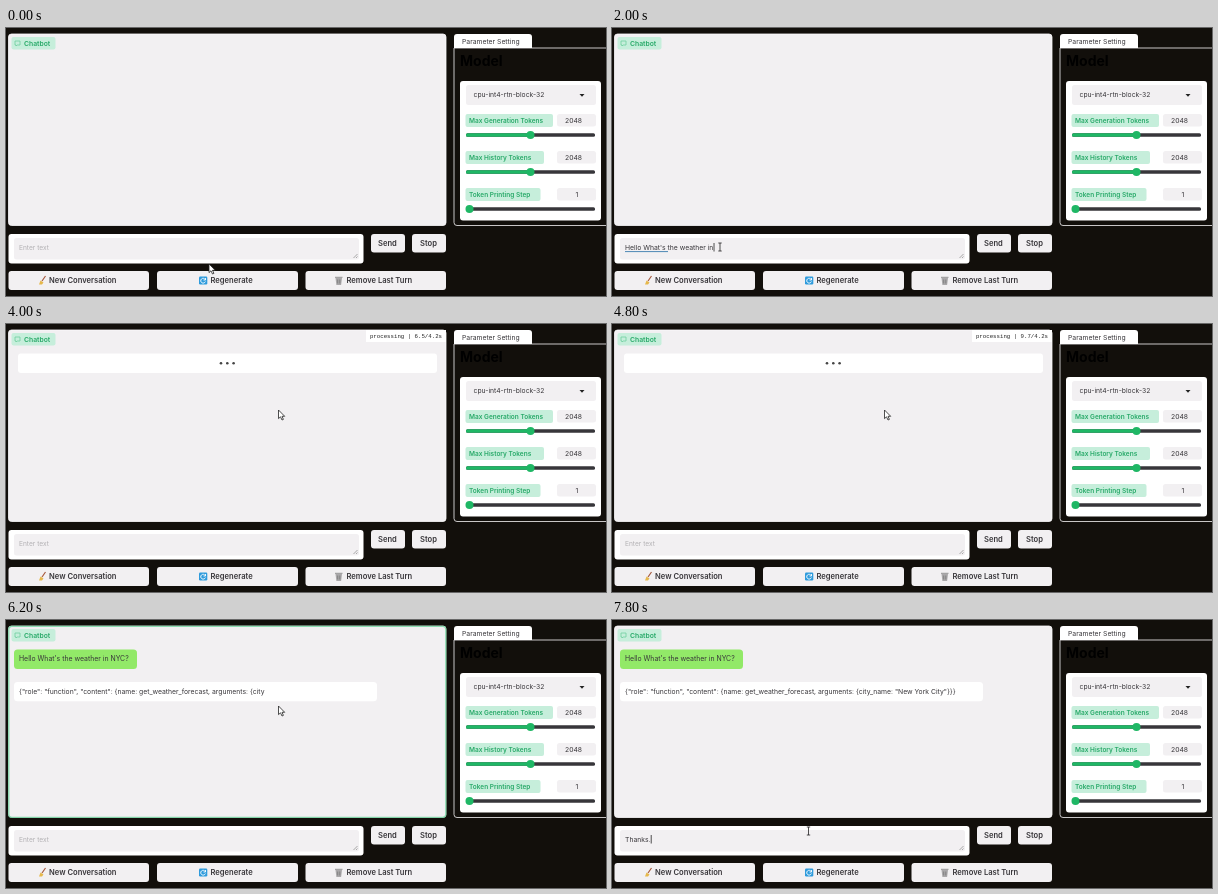
Animation of 600x268 px, one loop 8 s. Source, as an HTML page:

```html
<!DOCTYPE html>
<html lang="en">
<head>
<meta charset="utf-8">
<title>Chatbot</title>
<style>
  html, body { margin: 0; width: 100%; height: 100%; overflow: hidden; background: #120f0b; }
  svg { display: block; width: 100%; height: 100%; }
  text { font: 6.8px Inter, sans-serif; fill: #38363a; white-space: pre; }
  .button { font-size: 7.6px; font-weight: 600; }
  .label { font-size: 6.5px; font-weight: 600; fill: #27a968; }
  .title { font-size: 14px; font-weight: 700; fill: #000; }
  .hint { font-size: 6.6px; fill: #b3b1b4; }
  .status { font: 5.72px "Liberation Mono", monospace; fill: #222; }
  .soft { fill: #f2f0f2; }
  .white { fill: #fff; }
  .mint { fill: #c6eedb; }
</style>
</head>
<body>
<svg viewBox="0 0 600 268">
  <rect width="600" height="268" fill="#120f0b"/>

  <!-- conversation -->
  <rect class="soft" x="2.5" y="6" width="437.5" height="191.5" rx="3" stroke="#fbfafb" stroke-width=".8"/>
  <rect id="glow" x="2.8" y="6.3" width="437" height="191" rx="3" fill="none" stroke="#35c878" stroke-width="1.3"/>
  <rect class="mint" x="5.5" y="9" width="44" height="12.5" rx="2"/>
  <path d="M9 13h5v4h-3l-1 1v-1h-1z" fill="none" stroke="#6fcf9f" stroke-width=".8"/>
  <text class="label" x="18" y="17.7" style="font-size:6.8px">Chatbot</text>

  <g id="pending">
    <rect class="white" x="12" y="29.5" width="419" height="19.5" rx="3"/>
    <g fill="#444"><circle cx="215" cy="39.3" r="1.3"/><circle cx="221.3" cy="39.3" r="1.3"/><circle cx="227.6" cy="39.3" r="1.3"/></g>
    <rect id="statusBox" class="white" y="6" height="12"/>
    <text id="status" class="status" x="436" y="13.6" text-anchor="end"></text>
  </g>

  <g id="answer">
    <rect x="8" y="29.5" width="123" height="19.5" rx="3.5" fill="#92e968"/>
    <text x="13" y="41.3" style="font-size:6.9px">Hello What's the weather in NYC?</text>
    <rect class="white" x="8" y="62" width="363" height="19.3" rx="3.5"/>
    <text id="reply" x="13" y="73.8"></text>
  </g>

  <!-- input -->
  <rect class="white" x="2.5" y="206" width="355" height="29.5" rx="3"/>
  <rect class="soft" x="8" y="210" width="345" height="21.5" rx="2.5"/>
  <path d="M347.5 230l4-4M350 230l1.5-1.5" stroke="#888" stroke-width=".7"/>
  <text id="hint" class="hint" x="13" y="221.8">Enter text</text>
  <text id="typed" x="13" y="221.8"></text>
  <path id="spelling" d="M13 223.6H56" stroke="#4d87b4"/>
  <path id="caret" d="M0 215v8.5" stroke="#222" stroke-width=".8"/>

  <g id="buttons"></g>
  <path d="M33 256.5l1.5-4 3 2-1.5 2z" fill="#e6b84c"/>
  <path d="M36 253l3.5-5" stroke="#a5583c" stroke-width="1.2"/>
  <rect x="193" y="248.5" width="8.3" height="8" rx="1.2" fill="#2f9bdc"/>
  <path d="M199.2 251.5a2.4 2.4 0 1 0 .2 2M199.5 250v2h-2" fill="none" stroke="#fff" stroke-width=".9"/>
  <path d="M329.5 250h6.5l-.9 7h-4.7z" fill="#aaa8aa"/>
  <path d="M329 249.3h7.5M331.7 251.5v4M333.8 251.5v4" stroke="#777" stroke-width=".8"/>

  <!-- parameters -->
  <path d="M600 20H448V194.5q0 3 3 3H600" fill="none" stroke="#dddbdc" stroke-width=".9"/>
  <path class="white" d="M448 20V9q0-3 3-3h72q3 0 3 3v11z"/>
  <text x="456" y="15.8">Parameter Setting</text>
  <text class="title" x="454" y="38">Model</text>
  <rect class="white" x="454" y="53" width="141" height="139.5" rx="3"/>
  <rect class="soft" x="460" y="57" width="130" height="20" rx="2.5"/>
  <text x="467.5" y="69.4">cpu-int4-rtn-block-32</text>
  <path d="M573.5 66h5l-2.5 2.8z" fill="#222"/>
  <g id="sliders"></g>

  <g id="mouse">
    <path id="arrow" d="M0 0V8.6L2 6.8 3.5 10 4.9 9.4 3.5 6.3H6.2Z" fill="#fff" stroke="#222" stroke-width=".8"/>
    <path id="beam" d="M-1.7-4H1.7M0-4V4M-1.7 4H1.7" stroke="#222" stroke-width=".8"/>
  </g>
</svg>
<script>
const LOOP = 8000, STEP = 200, TYPE_MS = 55;
const QUESTION = "Hello What's the weather in NYC?";
const REPLY = '{"role": "function", "content": {name: get_weather_forecast, arguments: {city_name: "New York City"}}}';
const SENT = 2400, ANSWERED = 5400, FINISHED = 6600;
const MOUSE = [[0, 203, 236], [400, 108, 219], [2400, 108, 219], [3000, 232, 164.5], [3800, 272.5, 86],
  [6600, 272.5, 86], [7200, 225, 126], [7400, 196.5, 211], [8000, 196.5, 211]];

const $ = id => document.getElementById(id);
const show = (id, on) => $(id).style.display = on ? "" : "none";

function button(text, x, y, width, height, textX) {
  return `<rect class="soft" x="${x}" y="${y}" width="${width}" height="${height}" rx="3"/>
    <text class="button" x="${textX}" y="${y + height / 2 + 2.6}">${text}</text>`;
}

function slider(text, y, labelWidth, value, thumb) {
  return `<rect class="mint" x="459.5" y="${y - 21}" width="${labelWidth}" height="13" rx="2"/>
    <text class="label" x="463" y="${y - 12.2}">${text}</text>
    <rect class="soft" x="551" y="${y - 21}" width="39" height="12.5" rx="2.5"/>
    <text x="${value > 9 ? 567.5 : 571}" y="${y - 12.2}" text-anchor="middle">${value}</text>
    <rect x="460" y="${y - 1.8}" width="129" height="3.6" rx="1.5" fill="#37363a"/>
    <rect x="460" y="${y - 1.8}" width="${thumb - 460}" height="3.6" rx="1.5" fill="#1fb765"/>
    <circle cx="${thumb}" cy="${y}" r="4" fill="#1fb765"/>`;
}

$("buttons").innerHTML =
  button("Send", 365, 206, 34, 18.5, 372) + button("Stop", 406, 206, 34, 18.5, 414) +
  button("New Conversation", 2.5, 243, 140.5, 19, 43) +
  button("Regenerate", 151, 243, 141, 19, 204.5) +
  button("Remove Last Turn", 299.5, 243, 140.5, 19, 340.5);
$("sliders").innerHTML =
  slider("Max Generation Tokens", 107, 87.5, 2048, 524.5) +
  slider("Max History Tokens", 144, 78.5, 2048, 524.5) +
  slider("Token Printing Step", 181, 75, 1, 463.5);

function mouseAt(t) {
  const i = MOUSE.findIndex(point => point[0] > t);
  const [t0, x0, y0] = MOUSE[i - 1], [t1, x1, y1] = MOUSE[i];
  const k = (t - t0) / (t1 - t0);
  return [x0 + (x1 - x0) * k, y0 + (y1 - y0) * k];
}

function typedAt(t) {
  if (t < SENT) return QUESTION.slice(0, Math.max(0, Math.floor(27 + (t - 2000) / TYPE_MS)));
  return "Thanks.".slice(0, Math.max(0, Math.floor((t - 7400) / TYPE_MS)));
}

function drawInput(t) {
  const text = typedAt(t);
  $("typed").textContent = text;
  show("hint", !text);
  show("spelling", t < SENT && text.length > 12);
  show("caret", text);
  $("caret").setAttribute("transform", `translate(${13.7 + $("typed").getComputedTextLength()})`);
}

function drawChat(t) {
  show("pending", t >= SENT && t < ANSWERED);
  show("answer", t >= ANSWERED);
  show("glow", t >= ANSWERED && t < FINISHED);
  $("glow").style.opacity = 0.75 + 0.25 * Math.cos((t - 5600) / 500 * Math.PI);

  const status = `processing | ${(2.6 + (t - 3000) * 0.00394).toFixed(1)}/4.2s`;
  const width = status.length * 3.43 + 8;
  $("status").textContent = status;
  $("statusBox").setAttribute("x", 440 - width);
  $("statusBox").setAttribute("width", width);
  $("reply").textContent = REPLY.slice(0, Math.max(0, Math.round(20 + (t - 5600) * 0.095)));
}

function drawMouse(t) {
  const [x, y] = mouseAt(t);
  const overInput = x > 8 && x < 353 && y > 209 && y < 232;
  $("mouse").setAttribute("transform", `translate(${x} ${y})`);
  show("arrow", !overInput);
  show("beam", overInput);
}

function frame() {
  const t = Math.floor(performance.now() % LOOP / STEP) * STEP;
  drawInput(t);
  drawChat(t);
  drawMouse(t);
  requestAnimationFrame(frame);
}
frame();
</script>
</body>
</html>
```
